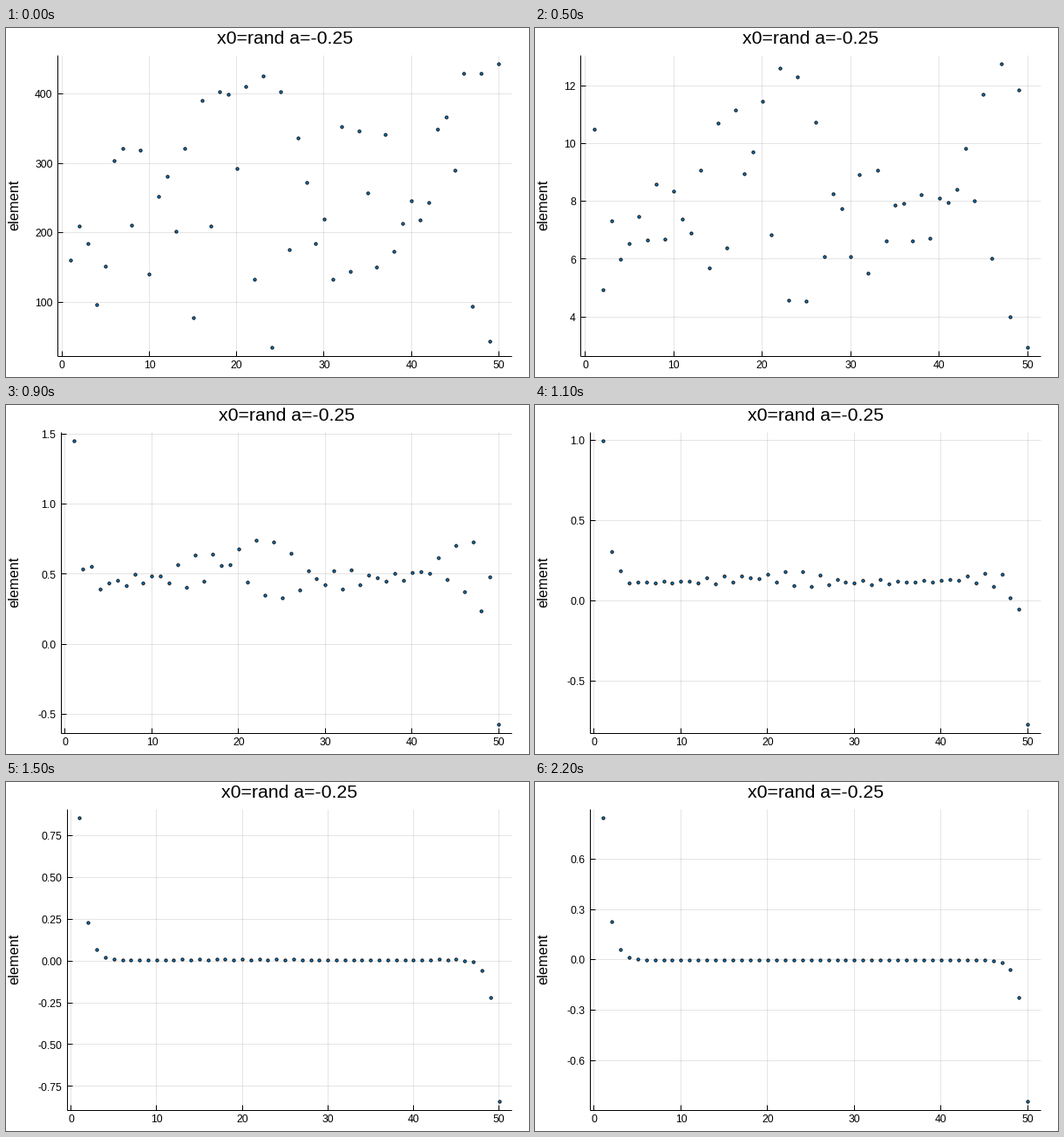
Animation of 600x400 px, one loop 3700 ms. Source, as a matplotlib script:

```python
import math

import matplotlib.pyplot as plt
import numpy as np
from matplotlib.animation import FuncAnimation

W, H, DPI = 600, 400, 100
PX = 72 / DPI                      # points per pixel
TOP, BOTTOM, RIGHT = 31.5, 376, 580
TICK_FONT, LABEL_FONT, TITLE_FONT = 12.1, 16.4, 21.3
STEPS, FRAMES = 22, 37
COUPLING = 0.25

plt.rcParams["font.family"] = "Liberation Sans"
plt.rcParams["axes.unicode_minus"] = False

START = np.array([
    160.7, 210.3, 184.5, 97, 152, 304, 322, 211.5, 318.5, 140,
    252.5, 281.5, 201.7, 321.7, 78.3, 390, 210.3, 403.7, 399, 293,
    410.7, 133, 425.5, 34.8, 403.5, 175.3, 336, 273, 185.2, 220,
    133, 352.4, 144, 346.7, 257.7, 150.7, 341.8, 173.5, 213.5, 245.5,
    218.5, 243.3, 349.3, 367, 290, 429.3, 94.3, 429, 43.5, 443])


def jacobi(x):
    """One sweep for the periodic tridiagonal system."""
    new = COUPLING * (np.roll(x, 1) + np.roll(x, -1))
    new[0] += 1
    new[-1] -= 1
    return new


states = [START]
for _ in range(STEPS):
    states.append(jacobi(states[-1]))


def limits(v):
    pad = 0.03 * (v.max() - v.min())
    return v.min() - pad, v.max() + pad


def nice_ticks(lo, hi):
    """Pick the step that best balances count, coverage and roundness."""
    span = hi - lo
    order = math.floor(math.log10(span))
    best = (-math.inf, None, None)
    for z in range(order - 2, order + 1):
        for q, nice in ((1, 1), (5, 0.9), (2, 0.7), (2.5, 0.5), (3, 0.2)):
            step = q * 10.0 ** z
            first, last = math.ceil(lo / step), math.floor(hi / step)
            n = last - first + 1
            if not 4 <= n <= 8:
                continue
            count = 1 - abs(n - 5) / 5
            cover = 1.5 * span / ((n - 1) * step)
            score = count / 4 + cover / 3 + nice / 4
            if score > best[0]:
                best = score, step, np.arange(first, last + 1) * step
    _, step, ticks = best
    digits = next(d for d in range(8) if abs(round(step, d) - step) < 1e-9)
    return ticks, [f"{t + 0.0:.{digits}f}" for t in ticks]


def text_width(s):
    return TICK_FONT * sum({".": 0.278, "-": 0.584}.get(c, 0.556) for c in s)


fig = plt.figure(figsize=(W / DPI, H / DPI), dpi=DPI, facecolor="white")
ax = fig.add_axes([0, 0, 1, 1])


def line(x0, y0, x1, y1, **style):
    ax.plot([x0 - 0.5, x1 - 0.5], [y0 - 0.5, y1 - 0.5], color="black",
            lw=PX, solid_capstyle="butt", **style)


def text(x, y, s, size, ha="center", **style):
    ax.text(x, y, s, fontsize=size * PX, ha=ha, va="baseline",
            color="black", **style)


def draw(frame):
    ax.clear()
    ax.set(xlim=(0, W), ylim=(H, 0))
    ax.axis("off")

    values = states[min(frame, STEPS)]
    index = np.arange(1, len(values) + 1)
    x_lo, x_hi = limits(index)
    y_lo, y_hi = limits(values)
    ticks, labels = nice_ticks(y_lo, y_hi)
    left = 39.4 + max(map(text_width, labels))

    def px(x):
        return left + (x - x_lo) / (x_hi - x_lo) * (RIGHT - left)

    def py(y):
        return BOTTOM - (y - y_lo) / (y_hi - y_lo) * (BOTTOM - TOP)

    for t in range(0, 51, 10):
        x = px(t)
        line(x, TOP, x, BOTTOM, alpha=0.1)
        line(x, BOTTOM, x, BOTTOM - 5.5)
        text(x, 390, str(t), TICK_FONT)
    for t, label in zip(ticks, labels):
        y = py(t)
        line(left, y, RIGHT, y, alpha=0.1)
        line(left, y, left + 6, y)
        text(left - 6, y + 4.6, label, TICK_FONT, ha="right")
    line(left, TOP, left, BOTTOM + 0.5)
    line(left, BOTTOM, RIGHT + 0.5, BOTTOM)

    ax.plot(px(index), py(values), "o", ms=3.2 * PX, mfc="#009AF9",
            mec="black", mew=PX, snap=False)
    text((left + RIGHT) / 2, 18, "x0=rand a=-0.25", TITLE_FONT)
    text(14.5, 203, "element", LABEL_FONT, rotation=90,
         rotation_mode="anchor")
    return []


anim = FuncAnimation(fig, draw, frames=FRAMES, init_func=lambda: [],
                     interval=100, repeat=True, repeat_delay=0)
plt.show()
```
